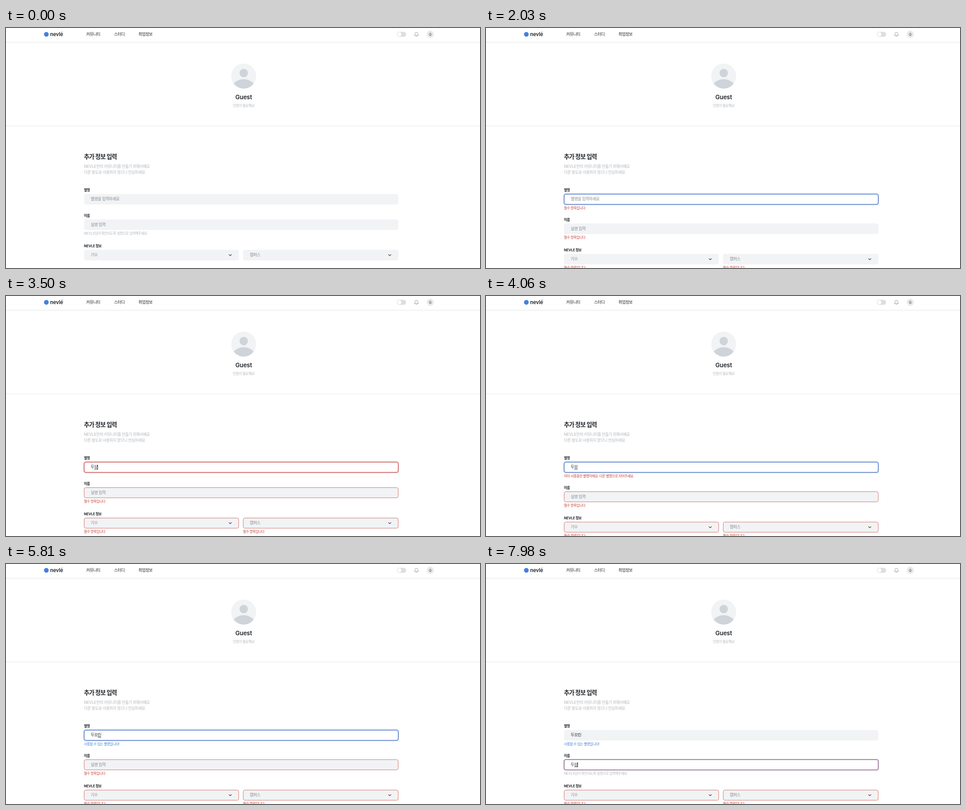
Write an HTML page that moves like this. It is 1052 by 532 pixels and loops after 8 s.

```html
<!DOCTYPE html>
<html lang="ko">
<head>
<meta charset="utf-8">
<title>추가 정보 입력</title>
<style>
  html, body { margin: 0; width: 100%; height: 100%; overflow: hidden; background: #fff; }
  svg { display: block; width: 100%; height: 100%; }
  text { font-family: Inter, 'Noto Sans CJK KR', 'Noto Sans CJK JP', 'Noto Sans CJK', sans-serif; letter-spacing: -.056em; white-space: pre; }
  .latin { letter-spacing: -.01em; }
</style>
</head>
<body>
<svg id="stage" viewBox="0 0 1052 532" xmlns="http://www.w3.org/2000/svg">
  <defs><clipPath id="round"><circle cx="527.5" cy="106.7" r="27.7"/></clipPath></defs>
</svg>
<script>
const LOOP = 8000, FADE = 280, ROW = 9, TEXT_X = 188;
const INK = '#212529', MUTED = '#868b91', FAINT = '#b1b5ba', RED = '#c23b33', BLUE = '#3e7fd0';
const INPUT = 8.95, SMALL = 7.55, STEP = INPUT * .864;

const stage = document.getElementById('stage');

function add(parent, tag, attrs) {
  const node = document.createElementNS('http://www.w3.org/2000/svg', tag);
  parent.append(node);
  return set(node, attrs);
}

function set(node, attrs) {
  for (const key in attrs) node.setAttribute(key, attrs[key]);
  return node;
}

// Fills a text node; Latin runs keep their natural spacing.
function write(node, string) {
  if (node.shown === string) return;
  node.shown = string;
  node.innerHTML = string.replace(/[A-Za-zé]+/g, '<tspan class="latin">$&</tspan>');
}

// Places text by its left edge and the middle of its line.
function label(parent, string, x, mid, size, fill, weight = 400, anchor = 'start') {
  const node = add(parent, 'text', {
    x, y: mid + size * .37, 'font-size': size, fill, 'font-weight': weight, 'text-anchor': anchor
  });
  write(node, string);
  return node;
}

// Header
add(stage, 'circle', { cx: 89.5, cy: 14, r: 5.2, fill: '#467fdc' });
label(stage, 'nevlé', 98, 13.4, 11.2, INK, 600);
label(stage, '커뮤니티', 178, 13.5, INPUT, INK);
label(stage, '스터디', 240, 13.5, INPUT, INK);
label(stage, '취업정보', 294, 13.5, INPUT, INK);
add(stage, 'rect', { x: 867.3, y: 8.4, width: 20.6, height: 11.2, rx: 5.6, fill: '#dcdddf' });
add(stage, 'circle', { cx: 873, cy: 14, r: 4.6, fill: '#fff' });
add(stage, 'path', {
  d: 'M906.5 16.6C907.6 15.6 907.8 14.4 907.8 12.6A3.1 3.1 0 0 1 914 12.6C914 14.4 914.2 15.6 915.3 16.6ZM909.6 18A1.5 1.3 0 0 0 912.2 18',
  fill: 'none', stroke: '#8d9298', 'stroke-width': .9, 'stroke-linejoin': 'round', 'stroke-linecap': 'round'
});
add(stage, 'circle', { cx: 941.7, cy: 14, r: 7.9, fill: '#e8e9eb' });
label(stage, 'G', 941.7, 14, 7.2, '#3a3e43', 500, 'middle');
add(stage, 'rect', { x: 0, y: 31, width: 1052, height: 1, fill: '#e3e4e6' });

// Profile
add(stage, 'circle', { cx: 527.5, cy: 106.7, r: 27.7, fill: '#f1f3f5' });
add(stage, 'circle', { cx: 527.6, cy: 99.8, r: 9.3, fill: '#ced4da' });
add(stage, 'circle', { cx: 527.5, cy: 143.8, r: 30.3, fill: '#ced4da', 'clip-path': 'url(#round)' });
label(stage, 'Guest', 527.5, 153, 13.15, INK, 600, 'middle');
label(stage, '인증이 필요해요', 527.5, 172, SMALL, FAINT, 400, 'middle');
add(stage, 'rect', { x: 0, y: 216.5, width: 1052, height: 1, fill: '#e6e8ea' });

// Form heading
label(stage, '추가 정보 입력', 173, 285.5, 13.15, INK, 700);
label(stage, 'NEVLE만의 커뮤니티를 만들기 위해서예요', 173, 306.5, 8.7, FAINT);
label(stage, '다른 용도로 사용하지 않으니 안심하세요', 173, 319.7, 8.7, FAINT);

function makeField(parent, x, y, width, hint) {
  const box = { x: x + .5, y: y + .5, width: width - 1, height: 22.6, rx: 3.8 };
  const field = { hint };
  field.glow = add(parent, 'rect', { ...box, fill: 'none', 'stroke-width': 4 });
  field.box = add(parent, 'rect', box);
  field.text = label(parent, hint, x + 15, y + 11.2, INPUT, MUTED);
  field.line = add(parent, 'rect', { y: y + 15.8, height: .9, fill: INK });
  field.caret = add(parent, 'rect', { y: y + 6.2, width: 1, height: 11, fill: INK });
  field.note = label(parent, '', x, y + 31, SMALL, RED);
  return field;
}

function makeSelect(parent, x, width, hint) {
  const field = makeField(parent, x, 491.6, width, hint);
  add(parent, 'path', {
    d: `M${x + width - 22} 502.2l2.7 2.6 2.7-2.6`, fill: 'none', stroke: '#42474c',
    'stroke-width': 1.2, 'stroke-linecap': 'round', 'stroke-linejoin': 'round'
  });
  return field;
}

label(stage, '별명', 173, 359, SMALL, INK, 700);
const nick = makeField(stage, 173, 367.8, 698, '별명을 입력하세요');
const lower = add(stage, 'g', {});
label(lower, '이름', 173, 416.4, SMALL, INK, 700);
const name = makeField(lower, 173, 424.2, 698, '실명 입력');
label(lower, 'NEVLE 정보', 173, 482.8, SMALL, INK, 700);
const selects = [makeSelect(lower, 173, 344, '기수'), makeSelect(lower, 526, 345, '캠퍼스')];

// Field looks: border r, g, b, border width, glow, whiteness of the fill
const IDLE = [241, 243, 245, .8, 0, 0];
const FOCUS = [62, 108, 196, 1.3, .24, 1];
const ALERT = [208, 72, 62, 1.3, .24, 1];
const WRONG = [207, 100, 93, .9, 0, 0];

const NEEDED = ['필수 항목입니다', RED];
const LENGTH = ['두 글자 이상 열 글자 이하로 입력해주셔야 해요', RED];
const TAKEN = ['이미 사용중인 별명이에요. 다른 별명으로 지어주세요.', RED];
const USABLE = ['사용할 수 있는 별명입니다!', BLUE];
const REAL = ['NEVLE임이 확인되도록 실명으로 입력해주세요', FAINT];
const NONE = ['', RED];

const plan = {
  nick: {
    looks: [[0, IDLE], [1170, FOCUS], [2030, ALERT], [3430, FOCUS], [4060, ALERT], [4760, FOCUS], [6360, IDLE]],
    typed: [[0, ''], [2450, 'ㄷ'], [3080, '두'], [3430, '두모'], [4760, '두모리'], [4900, '두모린']],
    notes: [[0, NONE], [2030, NEEDED], [2450, LENGTH], [3430, NONE], [4060, TAKEN], [4760, NONE], [5320, USABLE]],
    carets: [[1400, 1820], [2310, 3010], [3080, 4060], [4550, 5530], [6020, 6440]],
    composing: [2450, 6020]
  },
  name: {
    looks: [[0, IDLE], [2030, WRONG], [6360, ALERT], [7840, FOCUS]],
    typed: [[0, ''], [7420, 'ㄷ'], [7560, '두'], [7840, '두모']],
    notes: [[0, REAL], [2030, NEEDED], [7420, LENGTH], [7840, REAL]],
    carets: [[6510, 7000], [7420, LOOP]],
    composing: [7420, LOOP]
  },
  select: {
    looks: [[0, IDLE], [2030, WRONG]],
    typed: [[0, '']],
    notes: [[0, NONE], [2030, NEEDED]],
    carets: [],
    composing: [0, 0]
  }
};

const within = (t, [from, to]) => t >= from && t < to;
const ease = p => p < .5 ? 4 * p ** 3 : 1 - 4 * (1 - p) ** 3;
const at = (keys, t) => keys.findLast(([start]) => t >= start)[1];

function lookAt(keys, t) {
  const i = keys.findLastIndex(([start]) => t >= start);
  const [start, goal] = keys[i];
  if (i === 0) return goal;
  const p = ease(Math.min(1, (t - start) / FADE));
  return keys[i - 1][1].map((v, k) => v + (goal[k] - v) * p);
}

function drawField(field, { looks, typed, notes, carets, composing }, t) {
  const [r, g, b, width, glow, white] = lookAt(looks, t);
  const stroke = `rgb(${r},${g},${b})`;
  const fill = IDLE.slice(0, 3).map(v => v + (255 - v) * white);
  set(field.glow, { stroke, 'stroke-opacity': glow });
  set(field.box, { stroke, 'stroke-width': width, fill: `rgb(${fill})` });

  const value = at(typed, t), count = value.length;
  write(field.text, value || field.hint);
  set(field.text, { fill: value ? INK : MUTED });
  set(field.line, {
    x: TEXT_X + (count - 1) * STEP,
    width: count && within(t, composing) ? STEP : 0
  });
  set(field.caret, {
    x: Math.floor(TEXT_X + count * STEP),
    visibility: carets.some(span => within(t, span)) ? 'visible' : 'hidden'
  });

  const [note, color] = at(notes, t);
  write(field.note, note);
  set(field.note, { fill: color });
}

function draw(t) {
  drawField(nick, plan.nick, t);
  drawField(name, plan.name, t);
  selects.forEach(field => drawField(field, plan.select, t));
  const shift = at(plan.nick.notes, t) === NONE ? 0 : ROW;
  set(lower, { transform: `translate(0 ${shift})` });
}

function tick() {
  draw(performance.now() % LOOP);
  requestAnimationFrame(tick);
}
tick();
</script>
</body>
</html>
```
